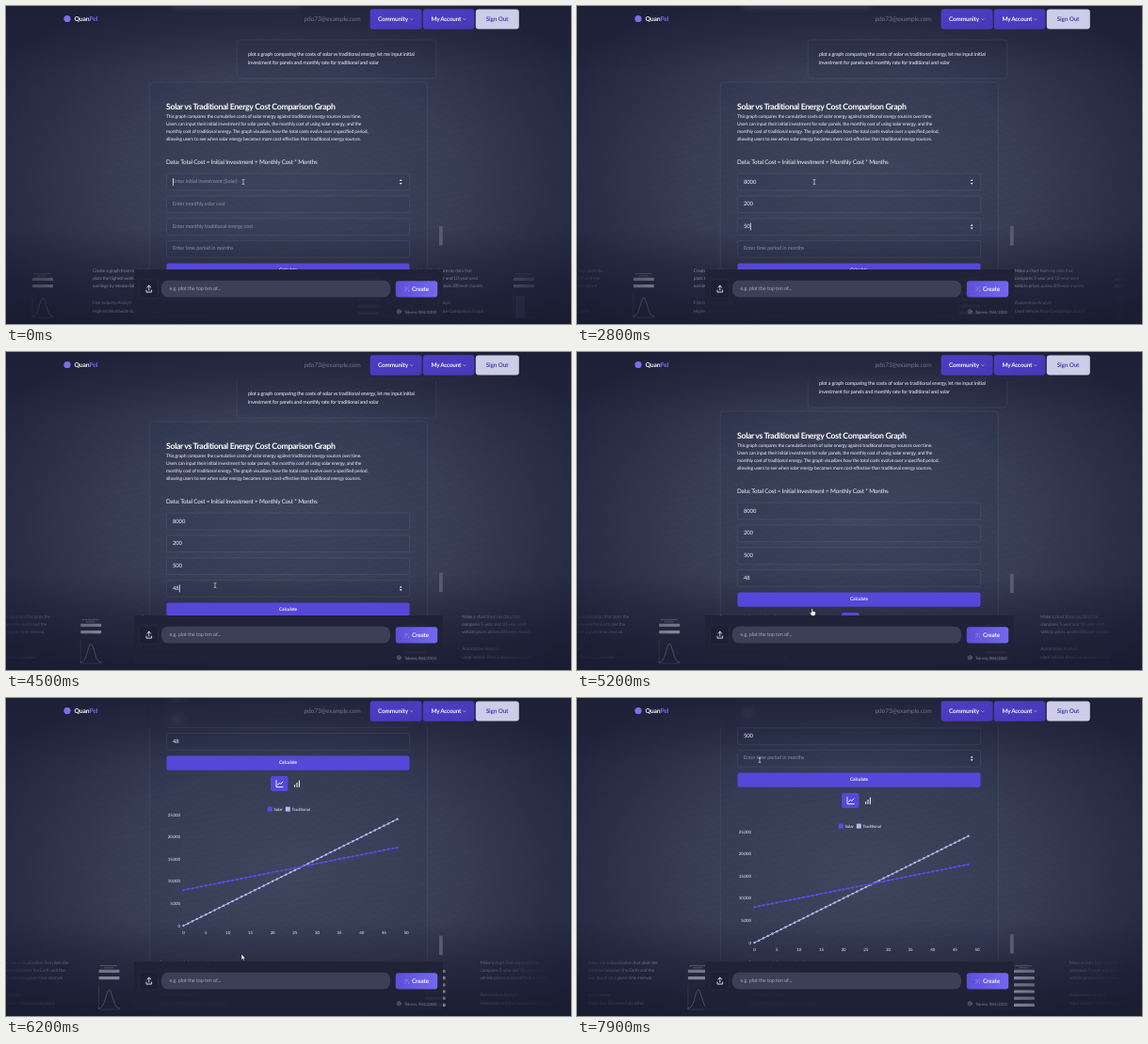
An HTML page that plays this animation: 600 by 338 pixels, repeating every 8000 ms.

```html
<!DOCTYPE html>
<html lang="en">
<head>
<meta charset="utf-8">
<title>Energy cost graph</title>
<style>
html, body { margin: 0; width: 100%; height: 100%; overflow: hidden; background: #20243b; }
svg { display: block; width: 100vw; height: 100vh; }
text {
  font: 400 5.5px Lato, "Open Sans", sans-serif; letter-spacing: -.02em;
  fill: #f2f2fa; dominant-baseline: central; text-rendering: geometricPrecision; white-space: pre;
}
.mid { text-anchor: middle; }
.end { text-anchor: end; }
.bold { font-weight: 700; }
.title { font-size: 8.8px; font-weight: 700; letter-spacing: -.042em; fill: #fff; }
.prompt { letter-spacing: -.037em; }
.para { font-size: 5px; letter-spacing: -.03em; }
.data { font-size: 6.4px; letter-spacing: -.03em; }
.value { font-size: 5.9px; }
.nav { font-size: 6.4px; font-weight: 700; }
.hint { fill: #c8cbe0; opacity: .6; }
.tick { font-size: 4.4px; }
.card { font-size: 4.8px; letter-spacing: -.03em; fill: #c3c5d8; opacity: .6; }
.dim { opacity: .38; }
.line { fill: none; stroke: #fff; stroke-linecap: round; stroke-linejoin: round; }
.edge { fill: #1e2040; fill-opacity: .06; stroke: #c4c8ea; stroke-opacity: .15; stroke-width: .6; }
#strip { animation: drift 8s linear infinite; }
@keyframes drift { to { transform: translateX(91px); } }
</style>
</head>
<body>
<svg viewBox="0 0 600 338" preserveAspectRatio="none">
  <defs>
    <radialGradient id="glow" gradientUnits="userSpaceOnUse" cx="0" cy="0" r="1" gradientTransform="translate(300 185) scale(355 235)">
      <stop offset="0" stop-color="#424960"/>
      <stop offset=".5" stop-color="#383e56"/>
      <stop offset="1" stop-color="#21253d"/>
    </radialGradient>
    <linearGradient id="shade" x2="0" y2="1">
      <stop offset="0" stop-color="#191b30" stop-opacity=".5"/>
      <stop offset=".2" stop-color="#191b30" stop-opacity="0"/>
      <stop offset=".7" stop-color="#191b30" stop-opacity="0"/>
      <stop offset=".87" stop-color="#191b30" stop-opacity=".55"/>
      <stop offset="1" stop-color="#191b30" stop-opacity=".85"/>
    </linearGradient>
    <linearGradient id="sides" gradientUnits="userSpaceOnUse" x1="-20" x2="585">
      <stop offset="0" stop-color="#000"/>
      <stop offset=".2" stop-color="#fff"/>
      <stop offset=".8" stop-color="#fff"/>
      <stop offset="1" stop-color="#000"/>
    </linearGradient>
    <linearGradient id="violet"><stop stop-color="#5c50d8"/><stop offset="1" stop-color="#7268ee"/></linearGradient>
    <linearGradient id="indigo" x2="1" y2="1"><stop stop-color="#4d3fc8"/><stop offset="1" stop-color="#4638b4"/></linearGradient>
    <pattern id="weave" width="16" height="7" patternUnits="userSpaceOnUse" patternTransform="rotate(14)">
      <path d="M0 1H9M8 4.5H16" stroke="#14162c" stroke-opacity=".12" stroke-width=".7"/>
    </pattern>
    <mask id="fade" maskUnits="userSpaceOnUse" x="0" y="270" width="600" height="68">
      <rect y="270" width="600" height="68" fill="url(#sides)"/>
    </mask>
    <clipPath id="view"><rect y="31" width="600" height="249"/></clipPath>
    <clipPath id="top"><rect width="600" height="31"/></clipPath>
    <filter id="blur" filterUnits="userSpaceOnUse" x="0" y="-20" width="600" height="70"><feGaussianBlur stdDeviation="3.5"/></filter>
  </defs>

  <rect width="600" height="338" fill="url(#glow)"/>
  <rect y="30" width="600" height="250" fill="url(#weave)"/>
  <rect width="600" height="338" fill="url(#shade)"/>

  <g mask="url(#fade)"><g id="strip"></g></g>

  <g clip-path="url(#view)">
    <g id="page">
      <rect x="176" y="-20" width="136" height="22" fill="#aeb2c8" opacity=".55"/>
      <rect class="edge" x="245.3" y="36" width="211.4" height="41" rx="3"/>
      <text class="prompt" x="257" y="52.2">plot a graph comparing the costs of solar vs traditional energy, let me input initial</text>
      <text class="prompt" x="257" y="61.2">investment for panels and monthly rate for traditional and solar</text>
      <rect class="edge" x="152.3" y="81" width="295" height="440" rx="4"/>
      <text class="title" x="170" y="106.3">Solar vs Traditional Energy Cost Comparison Graph</text>
      <text class="para" x="170" y="118.3">This graph compares the cumulative costs of solar energy against traditional energy sources over time.</text>
      <text class="para" x="170" y="126.2">Users can input their initial investment for solar panels, the monthly cost of using solar energy, and the</text>
      <text class="para" x="170" y="134.1">monthly cost of traditional energy. The graph visualizes how the total costs evolve over a specified period,</text>
      <text class="para" x="170" y="142">allowing users to see when solar energy becomes more cost-effective than traditional energy sources.</text>
      <text class="data" x="170" y="166.6">Data: Total Cost = Initial Investment + Monthly Cost * Months</text>
      <g id="form"></g>
      <rect x="170.5" y="273.6" width="258" height="15.2" rx="2" fill="#5548d9"/>
      <text class="mid bold" x="299.5" y="281.4" style="font-size:4.9px">Calculate</text>
      <rect x="281" y="295" width="18.6" height="16" rx="2" fill="#5548d9"/>
      <path class="line" d="M287 299.5V306.6H294.2M288.6 304.4L290.4 302.2L291.8 303.4L294 301" stroke-width=".9"/>
      <path class="line" d="M306.6 304.6V306.4M309 302.4V306.4M311.4 300V306.4" stroke-width="1"/>
      <g id="chart"></g>
    </g>
  </g>
  <g clip-path="url(#top)"><use href="#page" filter="url(#blur)" opacity=".3"/></g>

  <rect id="thumb" x="460" y="234" width="3.8" height="20.5" fill="#565b72"/>

  <circle cx="65" cy="13.5" r="3.6" fill="#7a6fe6"/>
  <text class="bold" x="72.5" y="14.3" style="font-size:6.8px">Quan<tspan fill="#7468ea">Pel</tspan></text>
  <text x="316.5" y="14" style="font-size:6.6px" fill-opacity=".38">pdo73@example.com</text>
  <rect x="386.6" y="3.2" width="55" height="21.6" rx="3" fill="url(#indigo)"/>
  <rect x="442.8" y="3.2" width="54.6" height="21.6" rx="3" fill="url(#indigo)"/>
  <rect x="498.8" y="3.4" width="46" height="21" rx="3" fill="#cdcde8"/>
  <text class="nav" x="395" y="14.2">Community</text>
  <text class="nav" x="451.5" y="14.2" style="letter-spacing:-.04em">My Account</text>
  <text class="nav mid" x="521.5" y="14.2" style="fill:#4d42b4">Sign Out</text>
  <path class="line" d="M429.4 13.4L430.8 14.8L432.2 13.4M485.6 13.4L487 14.8L488.4 13.4" stroke-width=".5" opacity=".8"/>

  <rect x="136" y="280" width="328" height="34" fill="#202338" opacity=".97"/>
  <rect x="136" y="314" width="328" height="18" fill="#202338" opacity=".92"/>
  <rect x="141.5" y="291" width="20" height="19.5" rx="3" fill="#1d1f36" stroke="#2f324a" stroke-width=".5"/>
  <path class="line" d="M149 302V304.1H154.6V302M151.8 302.1V297.3M149.8 299.1L151.8 297.2L153.8 299.1" stroke-width=".8"/>
  <rect x="165" y="291.8" width="243" height="17.8" rx="7" fill="#3c4057"/>
  <text class="hint" x="173.5" y="300.9" style="opacity:.75">e.g. plot the top ten of...</text>
  <rect x="413.8" y="292.3" width="44.4" height="17.3" rx="3" fill="url(#violet)"/>
  <path class="line" d="M423.4 303.3L427.2 299.1M424 298.9V300.3M427.6 302.1V303.3" stroke-width=".7" opacity=".4"/>
  <text class="nav" x="431" y="301.1">Create</text>
  <g opacity=".42">
    <circle class="line" cx="417.3" cy="324.8" r="2.1" stroke-width=".6"/>
    <path class="line" d="M416.3 324.8H418.3M417.3 323.8V325.8" stroke-width=".5"/>
    <text x="423" y="325" style="font-size:4.4px">Tokens: 984/2000</text>
  </g>

  <g id="mouse">
    <path id="beam" class="line" d="M-1 -2.6Q0 -2.6 0 -1.8Q0 -2.6 1 -2.6M0 -1.8V1.8M-1 2.6Q0 2.6 0 1.8Q0 2.6 1 2.6" stroke-width=".6" opacity=".85"/>
    <path id="arrow" d="M0 .8V6.8L1.4 5.6L2.3 7.6L3.3 7.1L2.4 5.2H4.2Z" fill="#fff" stroke="#15162a" stroke-width=".4"/>
    <path id="hand" d="M-1 1.6Q-.3 .8 .3 1.6V4L2.6 4.6Q3.6 4.9 3.3 6.2L2.6 8.8H-.8L-2.8 5.8Q-2.6 4.7 -1 5.8Z" fill="#fff" stroke="#15162a" stroke-width=".4"/>
  </g>
</svg>
<script>
const LOOP = 8000;
const $ = id => document.getElementById(id);

function add(parent, tag, attrs, text) {
  const el = document.createElementNS('http://www.w3.org/2000/svg', tag);
  for (const k in attrs) el.setAttribute(k, attrs[k]);
  if (text) el.textContent = text;
  return parent.appendChild(el);
}
const label = (parent, x, y, cls, text) => add(parent, 'text', { x, y, class: cls }, text);
const show = (el, on) => el.setAttribute('visibility', on ? 'visible' : 'hidden');

// Form
const fields = [
  'Enter initial investment (Solar)',
  'Enter monthly solar cost',
  'Enter monthly traditional energy cost',
  'Enter time period in months'
].map((hint, i) => {
  const form = $('form'), y = 187 + i * 23.8;
  add(form, 'rect', { class: 'edge', x: 170.5, y: y - 8.8, width: 258, height: 17.6, rx: 1.5 });
  return {
    y,
    hint: label(form, 177, y, 'hint', hint),
    value: label(form, 177, y, 'value', ''),
    caret: add(form, 'rect', { y: y - 4, width: .7, height: 8, fill: '#fff' }),
    spin: add(form, 'path', { d: `M417.8 ${y - .9}h2.8l-1.4 -1.8zM417.8 ${y + .9}h2.8l-1.4 1.8z`, fill: '#fff' })
  };
});

// Chart
const px = m => 188.5 + m * 4.73;
const py = v => 454 - v * 118 / 25000;
const chart = $('chart');
for (let v = 0; v <= 25000; v += 5000) {
  label(chart, 185, py(v), 'tick end', v.toLocaleString('en-US'));
  add(chart, 'path', { class: 'line', d: `M188.5 ${py(v)}H425`, 'stroke-width': .4, opacity: .04 });
}
for (let m = 0; m <= 50; m += 5) {
  label(chart, px(m), 461, 'tick mid', String(m));
  add(chart, 'path', { class: 'line', d: `M${px(m)} 336V456`, 'stroke-width': .4, opacity: .04 });
}
function series(name, colour, x, cost) {
  add(chart, 'rect', { x, y: 327.6, width: 5, height: 5, fill: colour });
  label(chart, x + 6.8, 330.2, 'tick', name);
  add(chart, 'path', { d: `M${px(0)} ${py(cost(0))}L${px(48)} ${py(cost(48))}`, stroke: colour, 'stroke-width': 1 });
  for (let m = 0; m <= 48; m++) add(chart, 'circle', { cx: px(m), cy: py(cost(m)), r: 1.2, fill: colour });
}
series('Traditional', '#b9b5f0', 296.8, m => 500 * m);
series('Solar', '#5a4ce2', 277.8, m => 8000 + 200 * m);

// Drifting examples behind the prompt bar
const strip = $('strip');
function example(x, lines, role, name) {
  lines.forEach((s, i) => label(strip, x, 282 + i * 8.2, 'card', s));
  label(strip, x, 315.5, 'card dim', role);
  label(strip, x, 324.7, 'card dim', name);
}
example(-78, ['Show me a visualization that plots the', 'distance between the Earth and the', 'Sun based on a given time interval.'],
  'Astronomer', 'Earth-Sun Distance Calculator');
example(92, ['Create a graph from my data that', 'plots the highest worldwide', 'earnings by release date.'],
  'Film Industry Analyst', 'Highest Worldwide Box Office Graph');
example(433, ['Make a chart from my data that', 'compares 5-year and 10-year used', 'vehicle prices across different models.'],
  'Automotive Analyst', 'Used Vehicle Price Comparison Graph');

function preview(x, rows, plot) {
  const g = add(strip, 'g', { transform: `translate(${x} 0)`, opacity: .6 });
  add(g, 'path', { class: 'line', d: 'M3 284.6H20M7 286.8H16', 'stroke-width': .8, 'stroke-dasharray': '1.6 1.2', opacity: .55 });
  for (let i = 0; i < rows; i++)
    add(g, 'rect', { x: 1, y: 288.8 + i * 7.2, width: 22, height: 3.2, rx: .6, fill: i % 2 ? '#c2c4d2' : '#a6a8bc' });
  if (plot) add(g, 'path', { class: 'line', d: 'M1 306V331H23', 'stroke-width': .4, opacity: .4 });
  if (plot === 'curve') {
    let d = '';
    for (let i = 0; i <= 22; i++) d += `${i ? 'L' : 'M'}${1 + i} ${330 - 20 * Math.exp(-(((i - 11) / 5) ** 2))}`;
    add(g, 'path', { class: 'line', d, 'stroke-width': .5, opacity: .7 });
  }
  if (plot === 'bars') add(g, 'path', { d: 'M3 308H13V331H3z', fill: '#8d90b8', opacity: .4 });
}
preview(27, 2, 'curve');
preview(373, 6);
preview(538, 2, 'bars');

// Timeline: [ms, focused field, its text]
const events = [
  [0, 0, ''], [600, 0, '8'], [780, 0, '80'], [920, 0, '800'], [1060, 0, '8000'],
  [1600, 1, ''], [1950, 1, '2'], [2100, 1, '20'], [2230, 1, '200'],
  [2450, 2, ''], [2650, 2, '5'], [2780, 2, '50'], [2900, 2, '500'],
  [3650, 3, ''], [4000, 3, '4'], [4200, 3, '48'],
  [5100, -1, ''], [7300, 3, '48'], [7390, 3, '']
];
const scrollKeys = [[3250, 0], [3500, 7], [4700, 7], [4950, 18], [5300, 18], [6200, 212], [6700, 212], [7050, 194]];
const xKeys = [[3050, 252], [3450, 222], [4500, 222], [5100, 250], [6750, 250], [7200, 194]];
const yKeys = [[3050, 187], [3450, 248], [4500, 248], [5100, 271.5], [6750, 271.5], [7200, 66]];
const easeOut = u => 1 - (1 - u) ** 3;
const smooth = u => u * u * (3 - 2 * u);

function track(keys, t, ease) {
  const i = keys.findIndex(k => k[0] > t);
  if (i === 0) return keys[0][1];
  if (i < 0) return keys[keys.length - 1][1];
  const [t0, a] = keys[i - 1], [t1, b] = keys[i];
  return a + (b - a) * ease((t - t0) / (t1 - t0));
}

function draw(t) {
  const scroll = track(scrollKeys, t, easeOut);
  const x = track(xKeys, t, smooth), y = track(yKeys, t, smooth);
  $('page').setAttribute('transform', `translate(0 ${-scroll})`);
  $('thumb').setAttribute('y', 234 + scroll * .088);

  const values = ['', '', '', ''];
  let focus = -1, last = 0;
  for (const [at, field, text] of events) {
    if (at > t) break;
    focus = field;
    last = at;
    if (field >= 0) values[field] = text;
  }
  const caretOn = (t - last) % 1000 < 500;
  let overField = false;
  fields.forEach((f, i) => {
    const hover = x > 170 && x < 429 && Math.abs(y + scroll - f.y) < 9;
    overField = overField || hover;
    f.value.textContent = values[i];
    show(f.hint, !values[i]);
    show(f.spin, hover || focus === i);
    show(f.caret, focus === i && caretOn);
    f.caret.setAttribute('x', 177 + (values[i] ? f.value.getComputedTextLength() + .3 : 0));
  });
  const overButton = y + scroll > 273 && y + scroll < 290;
  $('mouse').setAttribute('transform', `translate(${x} ${y})`);
  show($('beam'), overField);
  show($('hand'), overButton);
  show($('arrow'), !overField && !overButton);
}

let start;
function tick() {
  const now = performance.now();
  start ??= now;
  draw((now - start) % LOOP);
  requestAnimationFrame(tick);
}
draw(0);
requestAnimationFrame(tick);
</script>
</body>
</html>
```
